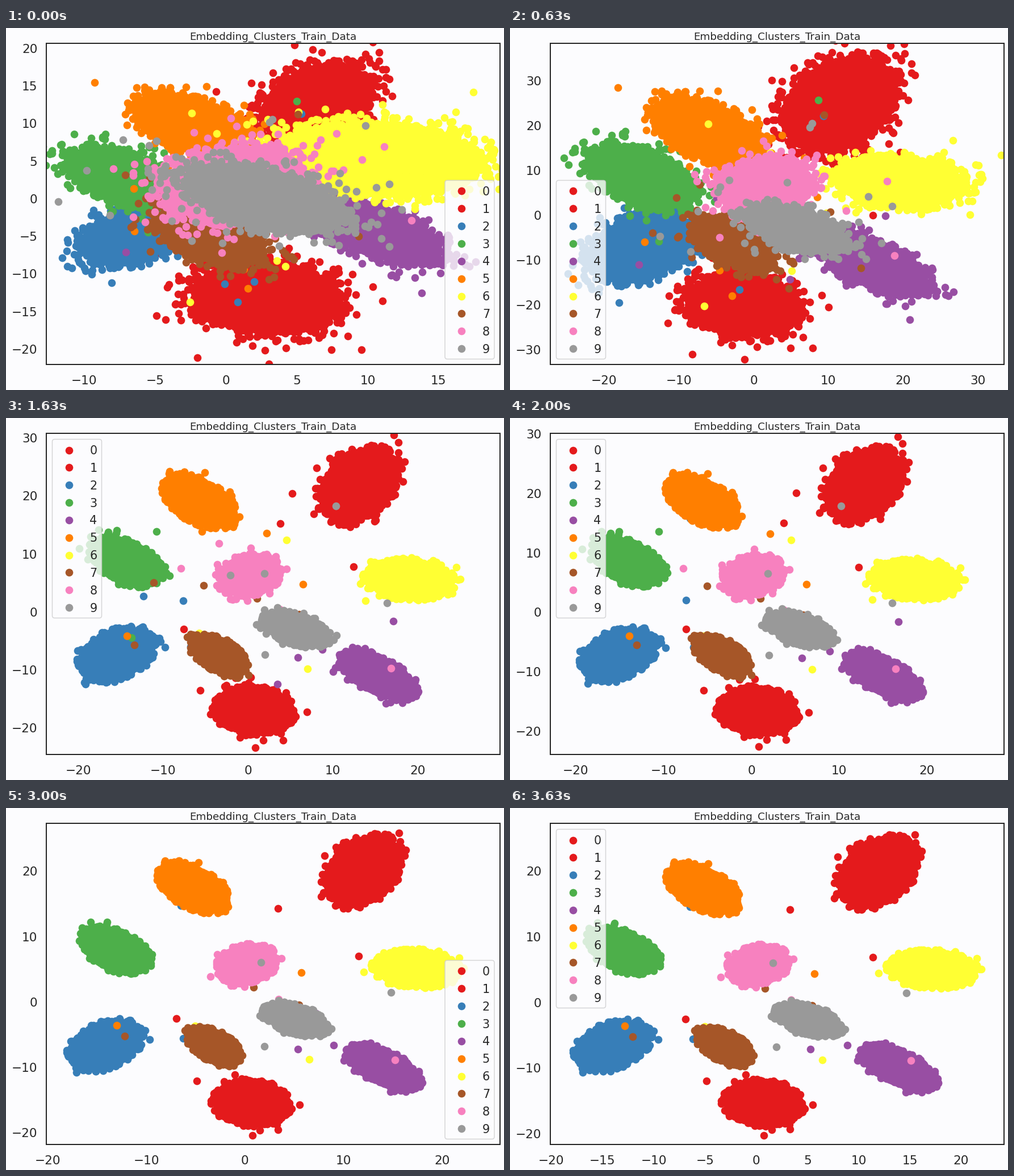
A matplotlib script for the animation above (3760 ms loop, 877 by 638 pixels).

```python
import numpy as np
import matplotlib.pyplot as plt
from matplotlib.animation import FuncAnimation
from matplotlib.patches import FancyBboxPatch
from matplotlib.ticker import MaxNLocator

W, H, DPI = 877, 638, 64
L, R, T, B = 71, 870, 27, 593
FRAMES, LOOP = 30, 3760
PAPER, INK = "#fcfcfe", "#262626"
RED, BLUE, GREEN, PURPLE = "#e41a1c", "#377eb8", "#4daf4a", "#984ea3"
ORANGE, YELLOW, BROWN, PINK, GRAY = "#ff7f00", "#ffff33", "#a65628", "#f781bf", "#999999"
DOT = 13.6

# Axis limits at the key epochs: x min, x max, y min, y max
EPOCHS = [0, 5, 9, 13, 20, 24, 29]
LIMITS = np.array([
    [-12.68, 19.33, -22.04, 20.68],
    [-27.20, 33.50, -33.30, 38.35],
    [-26.57, 31.83, -31.85, 38.00],
    [-23.75, 29.70, -24.55, 30.80],
    [-20.76, 26.43, -22.34, 28.33],
    [-19.94, 25.71, -21.67, 27.00],
    [-20.12, 23.80, -21.60, 27.30],
])

# How the whole embedding evolves; the first value of SIZE is per cluster
SHIFT = [1.20, 1.20, 1.20, 1.08, 1.00, 0.985, 0.975]
SIZE = [2.00, 1.50, 1.17, 1.00, 0.97, 0.97]
HALO = [110, 90, 40, 25, 16, 14, 14]
SPREAD = [0.17, 0.16, 0.14, 0.12, 0.09, 0.09, 0.09]
STRAYS = [16, 12, 8, 5, 3, 3, 3]

rng = np.random.default_rng(11)


def pt(px):
    return px * 72 / DPI


def key(i, values):
    return np.interp(i, EPOCHS, values)


class Cluster:
    """A tilted elliptic blob with a bumpy rim, a thinning halo and a few strays."""

    def __init__(self, color, start, mid, home, size, tilt=0.0, early=1.0):
        self.color, self.early, self.tilt = color, early, tilt
        self.start, self.mid, self.home = map(np.array, (start, mid, home))
        self.size = np.array(size)
        core, rim = np.arange(800), 120
        angle = np.concatenate([core * np.pi * (3 - 5 ** 0.5),
                                rng.uniform(0, 2 * np.pi, rim + max(HALO))])
        u, v = np.cos(angle), np.sin(angle)
        self.unit = np.column_stack([u, tilt * u + np.sqrt(1 - tilt ** 2) * v])
        self.radius = np.concatenate([0.93 * np.sqrt(core / len(core)),
                                      rng.uniform(0.85, 1.07, rim), np.ones(max(HALO))])
        self.drift = np.concatenate([np.zeros(len(core) + rim),
                                     rng.exponential(1, max(HALO))])
        self.solid = len(core) + rim
        self.pull = rng.uniform(0.35, 1.0, (max(STRAYS), 1))
        self.jitter = rng.normal(0, 1, (max(STRAYS), 2))
        self.hosts = rng.integers(0, 10, max(STRAYS))

    def center(self, i):
        if i < 5:
            return self.start + (self.mid - self.start) * i / 5
        settled = self.home * key(i, SHIFT)
        return settled + (self.mid - settled) * max(0, (9 - i) / 4)

    def points(self, i):
        mid, size = self.center(i), self.size * key(i, [self.early] + SIZE)
        n = self.solid + int(key(i, HALO))
        r = self.radius[:n] + self.drift[:n] * key(i, SPREAD)
        body = mid + r[:, None] * self.unit[:n] * size
        m = int(key(i, STRAYS))
        goals = np.array([clusters[h].center(i) for h in self.hosts[:m]])
        strays = mid + self.pull[:m] * (goals - mid) + self.jitter[:m] * size * 0.5
        return np.vstack([body, strays])


clusters = [
    Cluster(RED, (6.4, 12.6), (11.5, 24.7), (12.1, 20.3), (4.1, 5.6), 0.3),
    Cluster(RED, (2.9, -13.2), (-1.4, -20.0), (0.7, -15.7), (4.0, 3.6), -0.1, 1.4),
    Cluster(BLUE, (-6.6, -4.8), (-15.1, -7.0), (-14.4, -6.7), (3.8, 3.9), 0.35),
    Cluster(GREEN, (-7.4, 2.9), (-15.2, 8.6), (-13.3, 8.0), (3.6, 3.6), -0.45, 1.1),
    Cluster(PURPLE, (10.5, -4.2), (16.0, -10.8), (14.2, -10.1), (3.8, 3.5), -0.6, 1.3),
    Cluster(ORANGE, (-2.1, 9.6), (-6.0, 18.6), (-5.3, 17.7), (3.6, 3.9), -0.5, 1.15),
    Cluster(YELLOW, (10.7, 5.3), (19.6, 7.4), (17.6, 5.2), (4.4, 2.9), -0.1, 1.85),
    Cluster(BROWN, (-1.1, -4.8), (-2.6, -6.3), (-3.1, -6.9), (2.7, 2.9), -0.5, 1.45),
    Cluster(PINK, (0.6, 2.0), (1.6, 6.8), (0.2, 5.9), (3.1, 3.0), 0.15, 1.75),
    Cluster(GRAY, (2.7, 0.0), (5.7, -3.1), (5.2, -2.7), (3.3, 2.6), -0.5, 1.85),
]

plt.rcParams["font.family"] = "DejaVu Sans"
fig = plt.figure(figsize=(W / DPI, H / DPI), dpi=DPI, facecolor=PAPER)


def stage_box(x, y, w, h):
    return [x / W, 1 - (y + h) / H, w / W, h / H]


ax = fig.add_axes(stage_box(L, T, R - L, B - T), facecolor=PAPER)
for spine in ax.spines.values():
    spine.set(color=INK, linewidth=pt(2))
for axis, pad in (("x", 18.5), ("y", 15.5)):
    ax.tick_params(axis=axis, length=0, pad=pt(pad), labelsize=pt(21.6), labelcolor=INK)
for axis in (ax.xaxis, ax.yaxis):
    axis.set_major_locator(MaxNLocator(9, steps=[1, 2, 2.5, 5, 10]))
fig.text((L + R) / 2 / W, 1 - 21 / H, "Embedding_Clusters_Train_Data",
         ha="center", va="baseline", size=pt(18.4), color=INK)

dots = [ax.plot([], [], "o", ms=pt(DOT), mew=0, color=c.color, zorder=1.5)[0] for c in clusters]

LEG_W, LEG_H = 87, 315
LEFT, RIGHT, TOP, LOW = 81.5, 773, 37.5, 268.5
legend = fig.add_axes(stage_box(LEFT, TOP, LEG_W, LEG_H), zorder=5)
legend.set(xlim=(0, LEG_W), ylim=(LEG_H, 0))
legend.axis("off")
legend.add_patch(FancyBboxPatch(
    (0, 0), LEG_W, LEG_H, boxstyle="round,pad=0,rounding_size=4.2",
    fc=PAPER, ec="#cccccc", lw=pt(1.5), alpha=0.8, clip_on=False))
for n, c in enumerate(clusters):
    y = 19 + 30.85 * n
    legend.plot(29, y, "o", ms=pt(DOT), mew=0, color=c.color)
    legend.text(72.5, y - 0.5, str(n), ha="center", va="center_baseline",
                size=pt(20.8), color=INK)


def legend_corner(i):
    if i < 3 or 17 <= i < 27:
        return RIGHT, LOW
    return LEFT, LOW if i < 7 else TOP


def update(i):
    x0, x1, y0, y1 = (key(i, column) for column in LIMITS.T)
    ax.set(xlim=(x0, x1), ylim=(y0, y1))
    for line, c in zip(dots, clusters):
        line.set_data(*c.points(i).T)
    legend.set_position(stage_box(*legend_corner(i), LEG_W, LEG_H))
    return dots


anim = FuncAnimation(fig, update, frames=FRAMES, interval=LOOP / FRAMES,
                     repeat=True, repeat_delay=0, blit=False)
plt.show()
```
